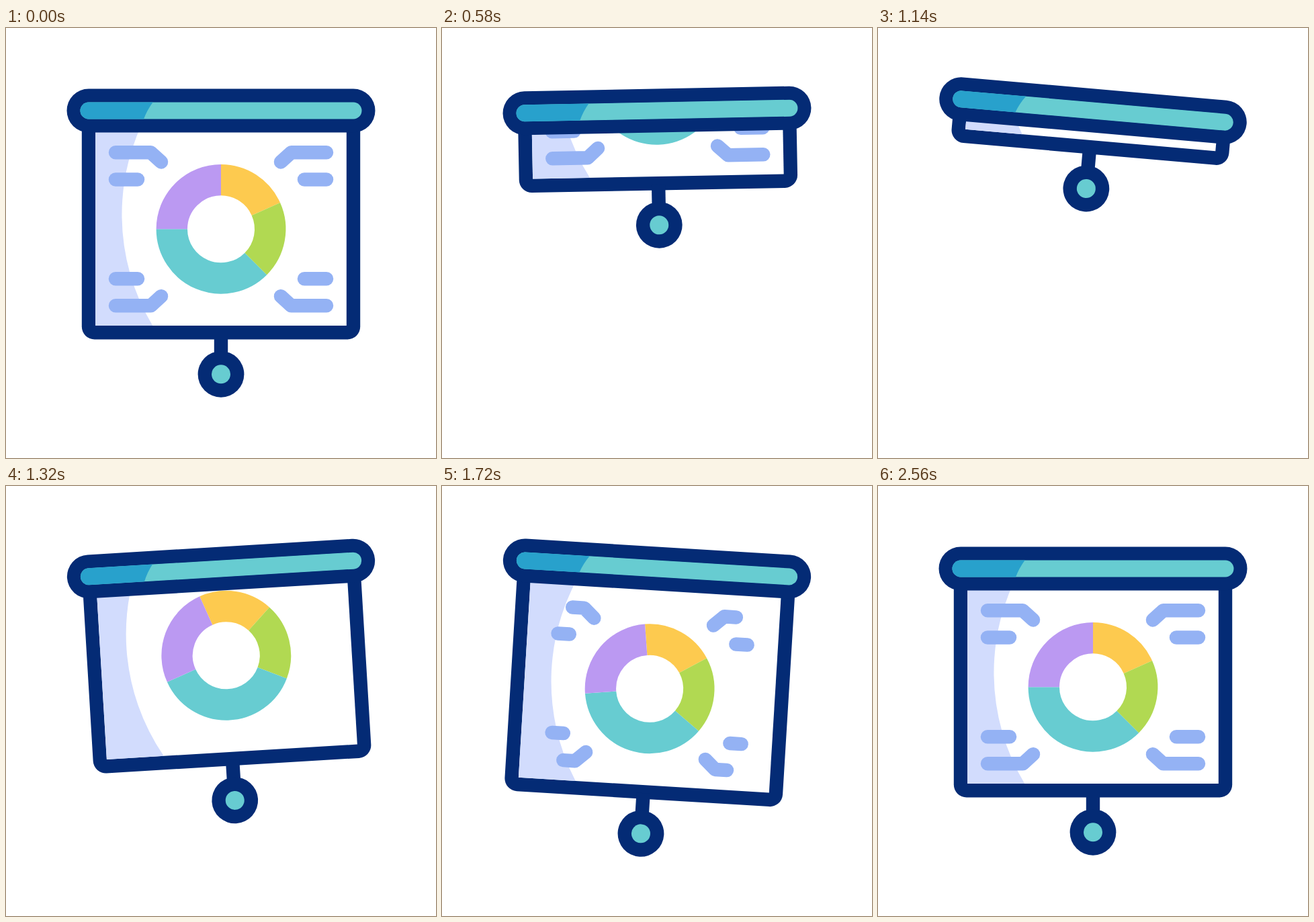
Animation of 640x640 px, one loop 2920 ms. Source, as an HTML page:

```html
<!DOCTYPE html>
<html lang="en">
<head>
<meta charset="utf-8">
<title>Presentation screen</title>
<style>
  html, body { margin: 0; width: 100%; height: 100%; overflow: hidden; background: #fff; }
  svg { display: block; width: 100%; height: 100%; }
</style>
</head>
<body>
<svg viewBox="0 0 640 640">
  <defs>
    <clipPath id="belowRoller"><rect x="0" y="123" width="640" height="700"/></clipPath>
    <clipPath id="rollerFill"><rect x="110.5" y="110.5" width="419" height="25" rx="12.5"/></clipPath>
    <g id="callout">
      <path class="line" pathLength="1" d="M231 199.4L215.5 185.3H163"/>
      <path class="line" pathLength="1" d="M196 225.4H163"/>
    </g>
  </defs>
  <g id="board">
    <g clip-path="url(#belowRoller)">
      <g id="screen">
        <rect x="112.8" y="-40" width="414.4" height="503.5" rx="19" fill="#042b75"/>
        <rect x="133.2" y="-40" width="373.6" height="483" fill="#fff"/>
        <path d="M133.2 120H214A321 321 0 0 0 218.2 443H133.2Z" fill="#d2dcfd"/>
        <g id="callouts" fill="none" stroke="#94b2f4" stroke-width="20.5" stroke-linecap="round" stroke-linejoin="round">
          <use href="#callout"/>
          <use href="#callout" transform="translate(640 0) scale(-1 1)"/>
          <use href="#callout" transform="translate(0 598.6) scale(1 -1)"/>
          <use href="#callout" transform="translate(640 598.6) scale(-1 -1)"/>
        </g>
        <g id="donut" fill="none" stroke-width="46.4"></g>
        <path d="M320 455V490" stroke="#042b75" stroke-width="20.4"/>
        <circle cx="320" cy="515.3" r="34.4" fill="#042b75"/>
        <circle cx="320" cy="515.3" r="14" fill="#67ccd1"/>
      </g>
    </g>
    <rect x="90.5" y="90.5" width="459" height="65" rx="32.5" fill="#042b75"/>
    <g clip-path="url(#rollerFill)">
      <rect x="110" y="110" width="420" height="26" fill="#67ccd1"/>
      <path d="M110 110H219Q210 122 204.800 136H110Z" fill="#28a1cc"/>
    </g>
  </g>
</svg>
<script>
  const LOOP = 2920;
  const CENTER = { x: 320, y: 299.3 };
  const byId = id => document.getElementById(id);
  const board = byId('board'), screen = byId('screen');
  const donut = byId('donut'), callouts = byId('callouts');
  const lines = document.querySelectorAll('.line');

  // Tracks are [time in ms, value] pairs, eased in and out between pairs.
  const tilt = [[200, 0], [400, 5], [760, -7.1], [1140, 5], [1425, -7.1], [1805, 5], [2080, 0]];
  const drop = [[200, 0], [305, 22.6], [700, -290], [1100, -290], [1420, 25], [1800, 0]];
  const spin = [[200, 0], [480, -30], [960, 30], [1440, -30], [2030, 18], [2560, 0]];
  const draw = [[1530, 0], [1900, 1]];

  function sample(track, t) {
    if (t <= track[0][0]) return track[0][1];
    for (let i = 1; i < track.length; i++) {
      const [t0, v0] = track[i - 1], [t1, v1] = track[i];
      if (t < t1) {
        const u = (t - t0) / (t1 - t0);
        return v0 + (v1 - v0) * u * u * (3 - 2 * u);
      }
    }
    return track[track.length - 1][1];
  }

  function ringPoint(degrees, radius) {
    const a = degrees * Math.PI / 180;
    return `${CENTER.x + radius * Math.sin(a)} ${CENTER.y - radius * Math.cos(a)}`;
  }

  function addSlice(from, to, color) {
    const r = 73.2;
    const slice = document.createElementNS('http://www.w3.org/2000/svg', 'path');
    slice.setAttribute('d', `M${ringPoint(from, r)}A${r} ${r} 0 0 1 ${ringPoint(to, r)}`);
    slice.setAttribute('stroke', color);
    donut.append(slice);
  }

  addSlice(0, 66, '#fdca4f');
  addSlice(66, 135, '#b1d952');
  addSlice(135, 270, '#67ccd1');
  addSlice(270, 360, '#bb99f2');

  function render(t) {
    board.setAttribute('transform', `rotate(${sample(tilt, t)} 320 123)`);
    screen.setAttribute('transform', `translate(0 ${sample(drop, t)})`);
    donut.setAttribute('transform', `rotate(${sample(spin, t)} ${CENTER.x} ${CENTER.y})`);
    // The callouts are rolled out of sight before they are drawn again.
    const shown = t < 900 ? 1 : sample(draw, t);
    callouts.style.display = shown > 0 ? '' : 'none';
    for (const line of lines) {
      line.setAttribute('stroke-dasharray', shown < 1 ? `${shown} 2` : 'none');
    }
  }

  const start = performance.now();
  function tick() {
    render((performance.now() - start) % LOOP);
    requestAnimationFrame(tick);
  }
  render(0);
  requestAnimationFrame(tick);
</script>
</body>
</html>
```
